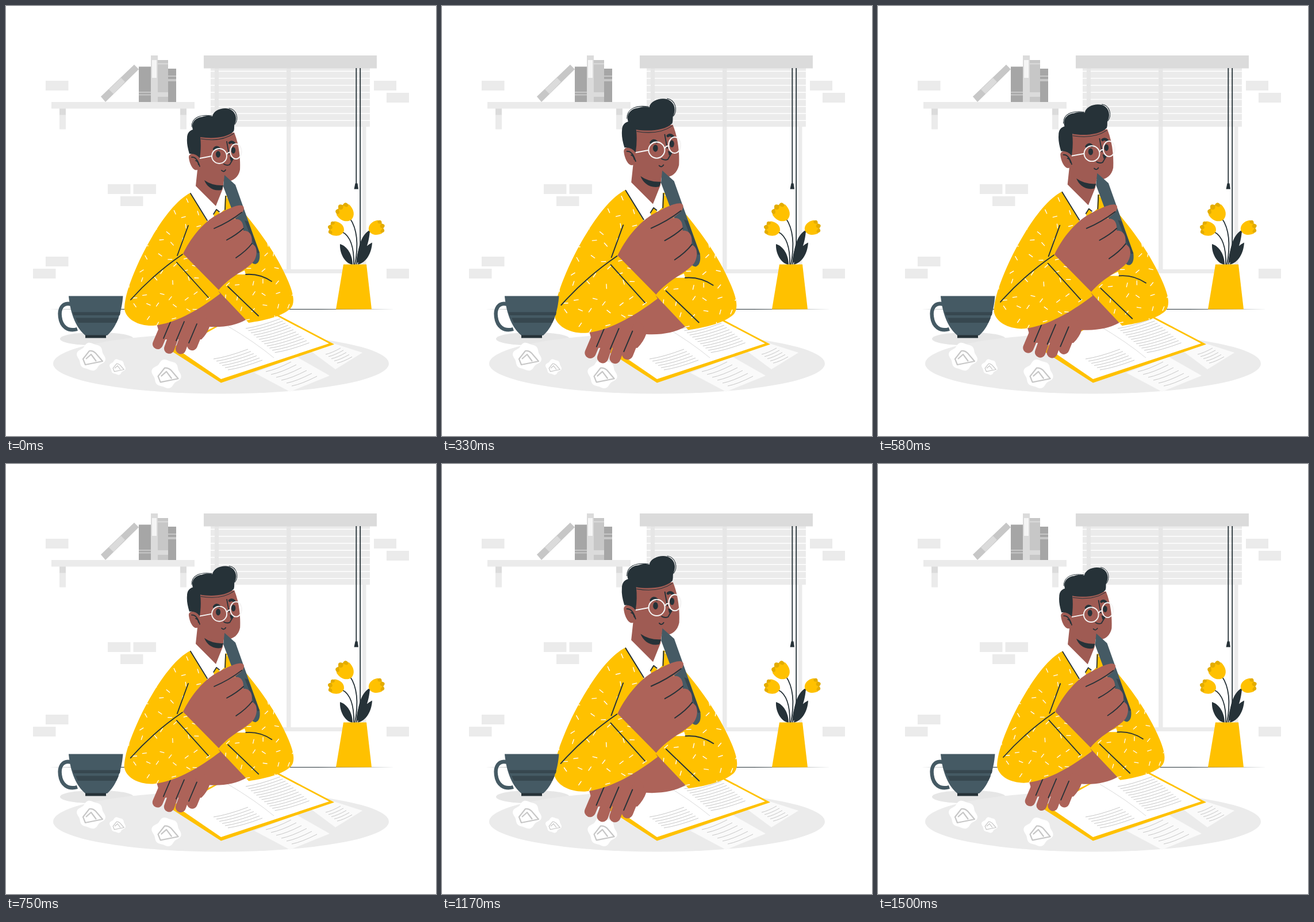
Write an HTML page that moves like this. It is 748 by 748 pixels and loops after 1540 ms.

```html
<!DOCTYPE html>
<html lang="en">
<head>
<meta charset="utf-8">
<title>Thinking writer</title>
<style>
html, body { margin: 0; width: 100%; height: 100%; overflow: hidden; background: #fff; }
svg { display: block; width: 100%; height: 100%; }
.line { fill: none; stroke: #263238; stroke-width: 1.8; stroke-linecap: round; stroke-linejoin: round; }
.thin { stroke-width: 1; }
.brow { stroke-width: 4.500; }
.dark { fill: #263238; }
.slate { fill: #455a64; }
.shade { fill: #37474f; }
.yellow { fill: #ffc100; }
.skin { fill: #ad6359; }
.face { fill: #9f5b53; }
.white { fill: #fff; }
.paper { fill: #fafafa; }
.pale { fill: #ebebeb; }
.light { fill: #dbdbdb; }
.mid { fill: #c7c7c7; }
.deep { fill: #a6a6a6; }
</style>
</head>
<body>
<svg viewBox="0 0 748 748">
  <defs>
    <g id="flower">
      <path d="M0 0L-13-20Q-14-32-5-28Q0-37 5-28Q14-32 13-20Z" fill="#e3ac00"/>
      <path class="yellow" d="M0 1C-10 0-16-10-14-23Q-8-17-5-27Q0-19 5-27Q8-17 14-23C16-10 10 0 0 1Z"/>
    </g>
    <g id="crumple">
      <path class="white blob"/>
      <path d="M-14 4L-3-10Q3-11 8-6L20 8L-10 14ZM-9 4L0-4L9 8" fill="none" stroke="#c7c7c7" stroke-width="2.200" stroke-linejoin="round"/>
    </g>
    <clipPath id="inSweater"><use href="#sweater"/></clipPath>
  </defs>

  <path id="bricks" stroke="#ebebeb" stroke-width="17" d="M69 138.500h39.500M640 138.500h39M662 159.500h39M177 318.500h39.500M221.500 318.500h39.500M199 339.500h39.500M69 444.500h39.500M47 465.500h39.500M662 465.500h39"/>

  <g id="shelf">
    <path class="pale" d="M79 167h249v11.500h-249zM93 178h11v36.500h-11zM303 178h11v36.500h-11z"/>
    <path class="light" d="M93 178.500h11v11h-11zM303 178.500h11v11h-11z"/>
    <path class="mid" d="M165 157.500L223 102L231 110L173 167Z"/>
    <path class="light" d="M179 145L200 125L207 132L187 153Z"/>
    <path class="deep" d="M231 105.500h21V167h-21zM282 109h14V167h-14z"/>
    <path class="light" d="M252 86h12V167h-12z"/>
    <path fill="#f5f5f5" d="M254 94h8v31h-8z"/>
    <path class="mid" d="M264 94h18V167h-18zM231 149h21v2h-21zM231 153.500h21v2h-21zM282 121h14v2h-14zM282 127h14v4h-14z"/>
    <path class="light" d="M264 99.500h18v2h-18zM264 150h18v8h-18z"/>
  </g>

  <g id="window">
    <path class="pale" d="M356 108h277v102h-277zM488 210h7.500v248h-7.500zM620 210h6.500v255h-6.500zM440 458h186v7h-186z"/>
    <path id="slats" stroke="#fff" stroke-width="1.500"/>
    <path fill="#e6e6e6" d="M363 108h7v102h-7zM488 108h7.500v102h-7.500z"/>
    <path class="light" d="M344 86h301v22.500h-301z"/>
    <path class="line" style="stroke-linecap:butt" d="M609.300 108V310M616.200 108V418"/>
    <path class="dark" d="M607.500 308.500h4L613 318.500h-7.500z"/>
  </g>

  <path class="dark" d="M75 527.500L200 527H540L676 527.500L540 528H200Z"/>

  <g id="plant">
    <path class="line" d="M607 450Q617 396 598 369M605 450Q606 404 585 393M610 449Q612 412 635 390"/>
    <path class="dark" d="M603 450C590 448 580 431 581 414C594 418 603 433 603 450ZM611 447C611 420 619 396 633 390C632 411 624 435 611 447ZM612 450C614 431 625 417 637 411.500C636 430 627 446 612 450Z"/>
    <use href="#flower" transform="translate(600 371) rotate(-40)"/>
    <use href="#flower" transform="translate(587 391) rotate(-75) scale(.86)"/>
    <use href="#flower" transform="translate(632 390) rotate(72) scale(.86)"/>
    <path class="yellow" d="M587 449.500H627L636 527.500H574Z"/>
  </g>

  <g id="desk">
    <ellipse cx="158" cy="579" rx="64" ry="11.500" fill="#e6e6e6"/>
    <ellipse class="pale" cx="374" cy="622" rx="292" ry="52.500"/>
    <path class="paper" d="M530 600L573 632L620 603L570 587ZM432 638L494 671L563 643L505 610Z"/>
    <path class="yellow" d="M283 597L374 655.500L571 588.500L471 536L400 540Z"/>
    <path class="white" d="M298 597L374 649L562 587L465 536L400 540Z"/>
    <path d="M386 557Q432 584 466 612" fill="none" stroke="#dbdbdb"/>
    <path id="writing" fill="none" stroke="#c7c7c7"/>
    <use href="#crumple" x="148" y="610"/>
    <use href="#crumple" transform="translate(194 628) scale(.56)"/>
    <use href="#crumple" transform="translate(279 640) scale(1.030)"/>
  </g>

  <g id="person">
    <path class="skin" d="M262 553L270 580H340Q350 570 354 558Q392 560 417 546L385 495H360Z"/>
    <path id="fingers" fill="none" stroke="#ad6359" stroke-width="18" stroke-linecap="round"/>
    <path id="creases" class="line"/>

    <path id="sweater" class="yellow" d="M321 325C288 341 253 399 232 443C215 480 206 508 206 527C209 546 232 557 256 556C298 552 340 525 372.500 500.500L369 495L422 551C450 547 480 540 495 526C504 516 499 498 491 479C471 431 437 386 409 354L384 330Z"/>
    <path id="flecks" clip-path="url(#inSweater)" stroke="#fff" stroke-width="1.300" stroke-linecap="round"/>

    <path class="white" d="M321 325L333 313L381 318V353L364 369L350 375ZM400 467L415 460L417 467Z"/>
    <path class="yellow" d="M361 364L366 354L372 361L364 369ZM381 330L390 342L386 356L380 354Z"/>
    <path class="line" d="M321 326L350 373M382 331L381 354M361 362L366 354L371 358"/>
    <path class="line" d="M317 382L298 434M217 511Q256 467 307 432M297 446L352 507M386 488L439 539M417 467Q441 465 462 479"/>

    <g id="head">
      <path class="face" d="M338 228L335 260C328 254 318 256 318 263C319 275 326 288 333 285L330 313L365 348L377 318L379 304C392 307 404 300 407 285C408 262 405 240 397 220Z"/>
      <path class="dark" d="M345 303Q359 313 378 312L375 320C360 323 349 314 345 303Z"/>
      <path class="dark" d="M315 230C315 221 319 217 325 215C321 204 329 194 341 193C349 190 355 191 359 192C361 181 377 176 388 179C399 183 403 194 398 205C396 208 398 213 396 218C384 230 357 231 338 228Q340 246 337 265Q331 256 319 257Q314 241 315 230Z"/>
      <path class="line thin" d="M323 210C323 195 336 188 358 191M388 178C402 180 405 197 398 206M339 231Q374 237 396 222"/>
      <path class="line" d="M323 263Q332 262 337 279M330 269Q334 270 335 276"/>
      <path class="line brow" d="M362 249Q366 243 371 248M389 238Q393 235 397 239"/>
      <ellipse class="dark" cx="369" cy="258" rx="4" ry="5.800"/>
      <ellipse class="dark" cx="395.500" cy="251" rx="3.700" ry="5.800"/>
      <path class="line" d="M384 236L388 258M391 264L395 266L389 276Q384 278 379 275M375 286Q379 290 382 285"/>
      <path class="dark" d="M389 262L396 265L391 270Z"/>
      <g fill="none" stroke="#f5f5f5" stroke-width="1.900">
        <circle cx="371" cy="261" r="13"/>
        <ellipse cx="400" cy="253" rx="9.800" ry="13"/>
        <path d="M337 265L358 261M384 258Q387 253 391 255"/>
      </g>
    </g>

    <path class="slate" d="M380 294L399 311L441 429Q443 446 434 449Q427 449 425 440L378 314Z"/>
    <path class="shade" d="M415 373L421 375L441 429L437 430L431 415Z"/>
    <path class="skin" d="M308 431C320 406 339 381 362 366C378 357 400 345 410 347C417 349 413 358 408 362L397 371C407 369 414 375 413 391C424 390 430 400 427 414C438 416 438 434 431 444C419 459 391 469 370 494Z"/>
    <path class="line" d="M362 387Q388 376 410 359M384 407Q401 398 413 387M400 438Q418 426 428 413"/>
  </g>

  <g id="cup">
    <path d="M113 518.500C98 515 92 527 94 541C96 557 107 567 124 562" fill="none" stroke="#455a64" stroke-width="6.500"/>
    <path class="slate" d="M109 504.500H203.500C201 536 191 560 176 573H138C122 560 112 536 109 504.500Z"/>
    <path class="shade" d="M116 532.500H199L198 538H118ZM121 542.500H196L192 551H125Z"/>
    <path class="dark" d="M138 572.500H174V577.500H138Z"/>
  </g>
</svg>
<script>
const LOOP = 1540, STEPS = 37;
const setPath = (selector, d) => document.querySelector(selector).setAttribute('d', d);
const repeat = (n, make) => Array.from({ length: n }, (_, i) => make(i)).join('');

let seed = 7;
const random = () => (seed = seed * 16807 % 2147483647) / 2147483647;

setPath('#slats', repeat(8, i => `M356 ${113.5 + i * 12.25}H633`));

// Rows of slightly bent handwriting; each row shifts by a step at both ends.
const writing = (rows, x, y, width, rise, stepX, stepY) => repeat(rows, i =>
  `M${x + stepX * i} ${y + stepY * i}q${width * .4} ${-rise * .2} ${width} ${-rise}`);
setPath('#writing',
  writing(12, 417, 561, 60, 17, 4.6, 3.8) +
  writing(6, 361, 614, 60, 17, 5, 3.8) +
  writing(5, 556, 606, 26, 11, 5, 3.8) +
  writing(6, 452, 636, 44, 17, 9, 5));

// Crumpled outline: a circle with uneven lobes.
setPath('.blob', repeat(60, i => {
  const a = i * Math.PI / 30, r = 23 + 1.6 * Math.sin(6 * a) + Math.sin(4 * a + 1);
  return `${i ? 'L' : 'M'}${r * Math.cos(a)} ${r * Math.sin(a)}`;
}) + 'Z');

setPath('#fingers', repeat(4, i => `M${281 + 20 * i} 548L${264 + 20 * i} ${597 - 3.5 * (i - 1.6) ** 2}`));
setPath('#creases', repeat(3, i => `M${288 + 22 * i} ${545 + 4 * i}l-14 33`));

// Short marks strewn over a jittered grid.
setPath('#flecks', repeat(13 * 10, i => {
  const x = 212 + 23 * (i % 13) + 14 * random(), y = 335 + 23 * Math.floor(i / 13) + 14 * random();
  const a = Math.PI * random(), dx = 3.5 * Math.cos(a), dy = 3.5 * Math.sin(a);
  return `M${x - dx} ${y - dy}L${x + dx} ${y + dy}`;
}));

// Breathing: turning points in ms, alternately out and in.
const turns = [-40, 250, 850, 1185, 1500];
function breath(t) {
  const i = Math.max(1, turns.findIndex(turn => t <= turn));
  const p = (t - turns[i - 1]) / (turns[i] - turns[i - 1]);
  const eased = (p + (1 - Math.cos(Math.PI * p)) / 2) / 2;
  return i % 2 ? eased : 1 - eased;
}

const person = document.querySelector('#person'), start = performance.now();
function draw() {
  const elapsed = (performance.now() - start) % LOOP;
  const step = Math.min(STEPS - 1, Math.floor((elapsed + 5) * STEPS / LOOP));
  const scale = .9913 + .096 * breath(step * LOOP / STEPS);
  person.setAttribute('transform', `translate(340 393) scale(${scale}) translate(-340 -393)`);
  requestAnimationFrame(draw);
}
draw();
</script>
</body>
</html>
```
